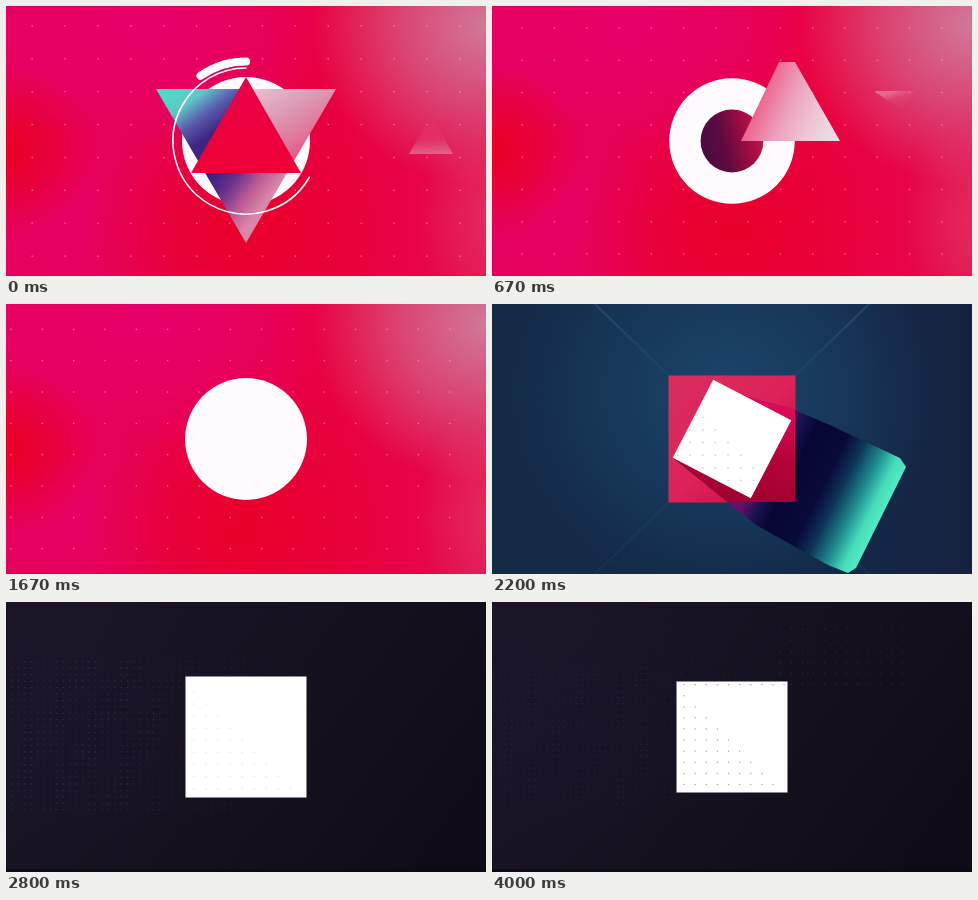
Recreate the animation shown at these times as an HTML page with a canvas. Size 480x270 px, loop 4.07 s.

```html
<!DOCTYPE html>
<html>
<head>
<meta charset="utf-8">
<style>
html, body { margin: 0; width: 100%; height: 100%; overflow: hidden; background: #17121f; }
canvas { display: block; width: 100vw; height: 100vh; }
</style>
</head>
<body>
<canvas id="stage" width="480" height="270"></canvas>
<script>
const ctx = document.getElementById('stage').getContext('2d');
const W = 480, H = 270, CX = 240, CY = 135;
const LOOP = 4070, STEPS = 61, CUT = 33;

const lerp = (a, b, p) => a + (b - a) * p;
const mix = (a, b, p) => a.map((v, i) => lerp(v, b[i], p));
const prog = (n, a, b) => Math.min(1, Math.max(0, (n - a) / (b - a)));
const easeOut = p => 1 - (1 - p) ** 3;
const smooth = p => p * p * (3 - 2 * p);

function addStops(g, colors) {
  colors.forEach((c, i) => Array.isArray(c)
    ? g.addColorStop(c[0], c[1])
    : g.addColorStop(i / (colors.length - 1), c));
  return g;
}
const linear = (x0, y0, x1, y1, ...colors) =>
  addStops(ctx.createLinearGradient(x0, y0, x1, y1), colors);

function glow(x, y, rx, ry, rgb, alpha) {
  ctx.save();
  ctx.translate(x, y);
  ctx.scale(rx, ry);
  ctx.fillStyle = addStops(ctx.createRadialGradient(0, 0, 0, 0, 0, 1),
    [`rgba(${rgb},${alpha})`, `rgba(${rgb},${alpha * 0.55})`, `rgba(${rgb},0)`]);
  ctx.fillRect(-1, -1, 2, 2);
  ctx.restore();
}

function trace(pts) {
  ctx.beginPath();
  pts.forEach(([x, y]) => ctx.lineTo(x, y));
  ctx.closePath();
}
function poly(pts, fill) {
  trace(pts);
  ctx.fillStyle = fill;
  ctx.fill();
}
function disc(r, fill) {
  ctx.beginPath();
  ctx.arc(CX, CY, r, 0, 7);
  ctx.fillStyle = fill;
  ctx.fill();
}
function arc(r, from, to, width) {
  ctx.beginPath();
  ctx.arc(CX, CY, r, from, to);
  ctx.lineWidth = width;
  ctx.strokeStyle = '#fff';
  ctx.stroke();
}
function zoom(s) {
  ctx.translate(CX, CY);
  ctx.scale(s, s);
  ctx.translate(-CX, -CY);
}

// alpha may be a number or a function of the dot's place
function dots(x0, y0, x1, y1, gap, rgb, alpha, size = 1) {
  for (let y = y0; y <= y1; y += gap)
    for (let x = x0; x <= x1; x += gap) {
      const a = typeof alpha === 'function' ? alpha(x, y) : alpha;
      if (a < 0.01) continue;
      ctx.fillStyle = `rgba(${rgb},${a})`;
      ctx.fillRect(x - size / 2, y - size / 2, size, size);
    }
}

function redBack() {
  ctx.fillStyle = linear(0, 0, W, 0, '#e6005c', '#e8004e', '#e90042', '#e6064a');
  ctx.fillRect(0, 0, W, H);
  glow(140, 20, 210, 130, '230,0,108', 0.95);
  glow(85, 215, 130, 100, '230,0,104', 0.8);
  glow(0, 145, 90, 85, '234,0,36', 1);
  glow(235, 225, 160, 120, '234,0,40', 0.95);
  glow(345, 60, 75, 130, '236,0,56', 0.5);
  glow(480, 20, 175, 160, '205,140,166', 0.85);
  glow(490, 215, 80, 120, '225,70,110', 0.6);
}

function flaps(n) {
  const k = 1 - 2 * easeOut(prog(n, 0, 7));
  const a = [240, 83], b = [195, 160], c = [285, 160];
  const tip = (p, q, t) => mix(mix(p, q, 0.5), t, k);
  const L = tip(a, b, [150, 83]), R = tip(a, c, [330, 83]), B = tip(b, c, [240, 237]);
  poly([a, b, L], linear(L[0] + 18, 72, 208, 126, '#45e2c6', [0.42, '#62c6c6'], [0.7, '#5a5fae'], '#3f2482'));
  poly([a, c, R], linear(256, 76, 300, 150, '#e6c3d2', [0.4, '#dd9db8'], [0.75, '#e0779c'], '#e8507e'));
  poly([b, c, B], linear(208, 164, 256, 200, '#3c1f80', [0.35, '#64308c'], [0.7, '#bb5a92'], '#d887a8'));
}

function sideTriangle(n) {
  const fade = 1 - prog(n, 18, 23);
  if (!fade) return;
  const up = [[425, 110], [403, 148], [447, 148]];
  const down = [[409, 104], [382, 85], [422, 85]];
  const peak = [[398, 74], [386, 106], [420, 108]];
  const pose = (from, to, p) => from.map((v, i) => mix(v, to[i], p));
  const pts = n < 10 ? pose(up, down, smooth(n / 10)) : pose(down, peak, smooth(prog(n, 10, 18)));
  const [t, l, r] = pts;
  const late = prog(n, 12, 18);
  ctx.globalAlpha = fade;
  poly(pts, linear(t[0], t[1], (l[0] + r[0]) / 2, (l[1] + r[1]) / 2,
    `rgba(224,140,166,${0.45 * late})`, [0.6, 'rgba(224,130,160,.13)'], `rgba(224,150,172,${0.6 * (1 - late)})`));
  ctx.globalAlpha = 1;
}

function shards(n) {
  const p = prog(n, 12, 18), out = prog(n, 18, 23);
  if (!p || out === 1) return;
  ctx.save();
  zoom(lerp(0.45, 1, easeOut(p)) + out * 0.4);
  ctx.globalAlpha = p * (1 - out);
  poly([[174, 200], [240, 165], [302, 182], [352, 270], [174, 270]],
    linear(174, 0, 352, 0, '#e8002c', [0.6, '#e8002e'], 'rgba(232,0,50,0)'));
  poly([[305, 142], [320, 161], [268, 214], [246, 196]], linear(318, 155, 255, 205, '#4a2f9e', '#35309c'));
  poly([[264, 192], [297, 176], [288, 192], [258, 202]], linear(265, 200, 292, 178, '#6b4a8e', [0.5, '#a01a50'], '#e2003c'));
  poly([[294, 187], [270, 214], [290, 238], [322, 212]], '#e4002e');
  poly([[300, 193], [341, 194], [321, 213]], linear(300, 190, 335, 208, '#9b1748', '#c73465'));
  poly([[174, 177], [186, 188], [174, 201]], linear(174, 180, 184, 195, '#d78aa5', '#d4446e'));
  poly([[240, 243], [214, 271], [266, 271]], linear(240, 243, 240, 271, '#86194d', '#cc1a50'));
  poly([[327, 222], [354, 219], [358, 232], [348, 240]], linear(330, 236, 355, 222, '#e30a40', '#d82c58'));
  ctx.restore();
}

function flyer(n) {
  const p = easeOut(prog(n, 5, 10)), out = prog(n, 10, 14);
  if (!p || out === 1) return;
  ctx.save();
  ctx.globalAlpha = p * (1 - out);
  ctx.translate(lerp(-45, 0, p) + out * 40, lerp(25, 0, p) - out * 30);
  poly([[287, 56], [303, 56], [348, 135], [249, 135]],
    linear(265, 90, 340, 122, '#ee5b87', [0.4, '#eba0bd'], [0.7, '#f0c0d2'], '#eadbe4'));
  ctx.restore();
}

function circleScene(n) {
  redBack();
  const dense = prog(n, 13, 17) * (1 - prog(n, 19, 23));
  const s = 1 - n * 0.0019;
  ctx.save();
  zoom(s);
  const gap = 32.9;
  dots(CX - 7.5 * gap, CY - 3.5 * gap, CX + 6.5 * gap, CY + 3.6 * gap, gap, '255,190,215', 0.6 * (1 - dense), 1.3);
  ctx.restore();

  if (dense) dots(83, 3, 400, 204, 5.2, '255,150,185', 0.6 * dense, 1.1);
  sideTriangle(n);
  shards(n);

  ctx.save();
  zoom(s);
  disc(64, '#fffafd');
  if (n < 7) {
    flaps(n);
    const p = smooth(prog(n, 0, 7));
    ctx.save();
    ctx.translate(CX, CY);
    ctx.rotate(p * Math.PI / 3);
    ctx.scale(1 - 0.4 * p, 1 - 0.4 * p);
    ctx.translate(-CX, -CY);
    poly([[240, 71], [295, 167], [185, 167]], linear(240, 71, 240, 167, '#ea0048', '#ef0036'));
    ctx.restore();

    const turn = easeOut(p) * 2.2, trim = prog(n, 0, 6);
    ctx.lineCap = 'round';
    const tail = 0.52 + turn, head = 1.5 * Math.PI + turn;
    if (trim < 1) {
      arc(73, lerp(tail, head, trim), head, 1.6);
      arc(79.5, lerp(-2.18, -1.57, trim) + turn, -1.57 + turn, 8 * (1 - 0.7 * trim));
    }
  }
  if (n >= 7 && n < 15) {
    const r = n < 10 ? lerp(48, 32, (n - 7) / 3) : 32 * (1 - smooth(prog(n, 10, 15)));
    disc(r, linear(CX - r, CY + 8, CX + r, CY - 8, '#4a0a43', [0.35, '#5d0a42'], [0.7, '#9c0c40'], '#c81249'));
  }
  ctx.restore();
  flyer(n);
}

function darkBack(n) {
  ctx.fillStyle = linear(60, 0, 420, 270, '#1b1527', '#16111f', '#0f0c17');
  ctx.fillRect(0, 0, W, H);
  glow(40, 130, 200, 130, '27,20,46', 0.5);
  ctx.fillStyle = 'rgba(12,7,22,.75)';
  ctx.fillRect(0, 267, W, 3);

  const blue = 1 - smooth(prog(n, 34, 41));
  if (!blue) return;
  ctx.globalAlpha = blue;
  ctx.fillStyle = linear(0, 0, W, 0, '#132b47', [0.7, '#14294a'], '#15223f');
  ctx.fillRect(0, 0, W, H);
  glow(235, 90, 215, 200, '28,76,114', 0.8);
  ctx.lineWidth = 2;
  for (const dx of [-1, 1])
    for (const dy of [-1, 1]) {
      const x = CX + 63 * dx, y = CY + 63 * dy;
      const strength = dy < 0 ? 0.5 : 0.15;
      ctx.strokeStyle = linear(x, y, x + 74 * dx, y + 72 * dy, 'rgba(40,96,142,.15)', `rgba(40,96,142,${strength})`);
      ctx.beginPath();
      ctx.moveTo(x, y);
      ctx.lineTo(x + 74 * dx, y + 72 * dy);
      ctx.stroke();
    }
  ctx.globalAlpha = 1;
}

function slab(p) {
  const top = [299, 117], low = [259, 194], left = [181, 154];
  const pts = [
    [[250, 91], [250, 91]], [[303, 106], top], [[340, 122], top], [[408, 154], top],
    [[414, 163], top], [[364, 264], low], [[356, 269], low], [[336, 261], low],
    [[264, 221], left], [left, left]
  ].map(([far, near]) => mix(far, near, p));
  const reach = 1 - 0.7 * p;
  poly(pts, linear(290, 120, 290 + 115 * reach, 120 + 57 * reach,
    '#6a1068', [0.12, '#1a1252'], [0.25, '#080634'], [0.5, '#070a3a'],
    [0.64, '#0c3559'], [0.8, '#1f8f92'], [0.92, '#45dcb8'], [1, '#50e8c2']));
  ctx.save();
  ctx.beginPath();
  ctx.rect(177, 72, 126, 126);
  ctx.clip();
  poly(pts, linear(270, 95, 250, 205, '#e20a5c', '#b60338', '#9c0230'));
  ctx.restore();
}

function squareScene(n) {
  darkBack(n);
  const side = 126 - (n - CUT) * 0.556;
  const s = side / 111;

  ctx.save();
  zoom(s);
  const flick = 0.85 + 0.15 * Math.sin(n * 0.9);
  const faint = n < 40 ? 0.06 : lerp(0.33, 0.24, prog(n, 42, 60));
  dots(-16, 66, 300, 206, 5.9, '150,140,190', (x, y) =>
    faint * flick * (x < 160 ? 1 : x < 240 ? 0.7 : 0.25) * (0.75 + 0.25 * Math.sin(x * 0.13 + y * 0.07 + n * 0.25)));
  const right = prog(n, 44, 52);
  if (right) dots(144, 27, 415, 86, 11.1, '150,140,180', x => right * (x > 278 ? 0.28 : 0.18));
  ctx.restore();

  const p = easeOut(prog(n, CUT, 40));
  if (p < 1) {
    const edge = side + 1;
    ctx.fillStyle = linear(177, 72, 303, 197, '#d92c60', '#dc235a', '#ca0536');
    ctx.fillRect(CX - edge / 2, CY - edge / 2, edge, edge);
    slab(p);
  }

  const w = lerp(88, side, p), tilt = lerp(27.4, 0, p) * Math.PI / 180;
  ctx.save();
  ctx.translate(CX, CY);
  ctx.rotate(tilt);
  ctx.beginPath();
  ctx.rect(-w / 2, -w / 2, w, w);
  ctx.fillStyle = '#fff';
  ctx.fill();
  ctx.clip();
  ctx.rotate(-tilt);
  ctx.translate(-CX, -CY);
  zoom(s);
  const ink = n < 40 ? 0.3 : lerp(0.16, 0.5, prog(n, 42, 60));
  for (let row = 0; row < 10; row++)
    for (let col = 0; col < 10; col++) {
      const top = row === 0;
      if (!top && col >= row) continue;
      ctx.fillStyle = `rgba(90,65,95,${top ? ink * prog(n, 44, 56) : ink})`;
      ctx.fillRect(191.5 + col * 11.1, 82 + row * 11.1, 1.2, 1.2);
    }
  ctx.restore();
}

const start = performance.now();
function tick() {
  const ms = (performance.now() - start) % LOOP;
  const n = Math.floor(ms * STEPS / LOOP + 0.08) % STEPS;
  ctx.clearRect(0, 0, W, H);
  n < CUT ? circleScene(n) : squareScene(n);
  requestAnimationFrame(tick);
}
tick();
</script>
</body>
</html>
```
